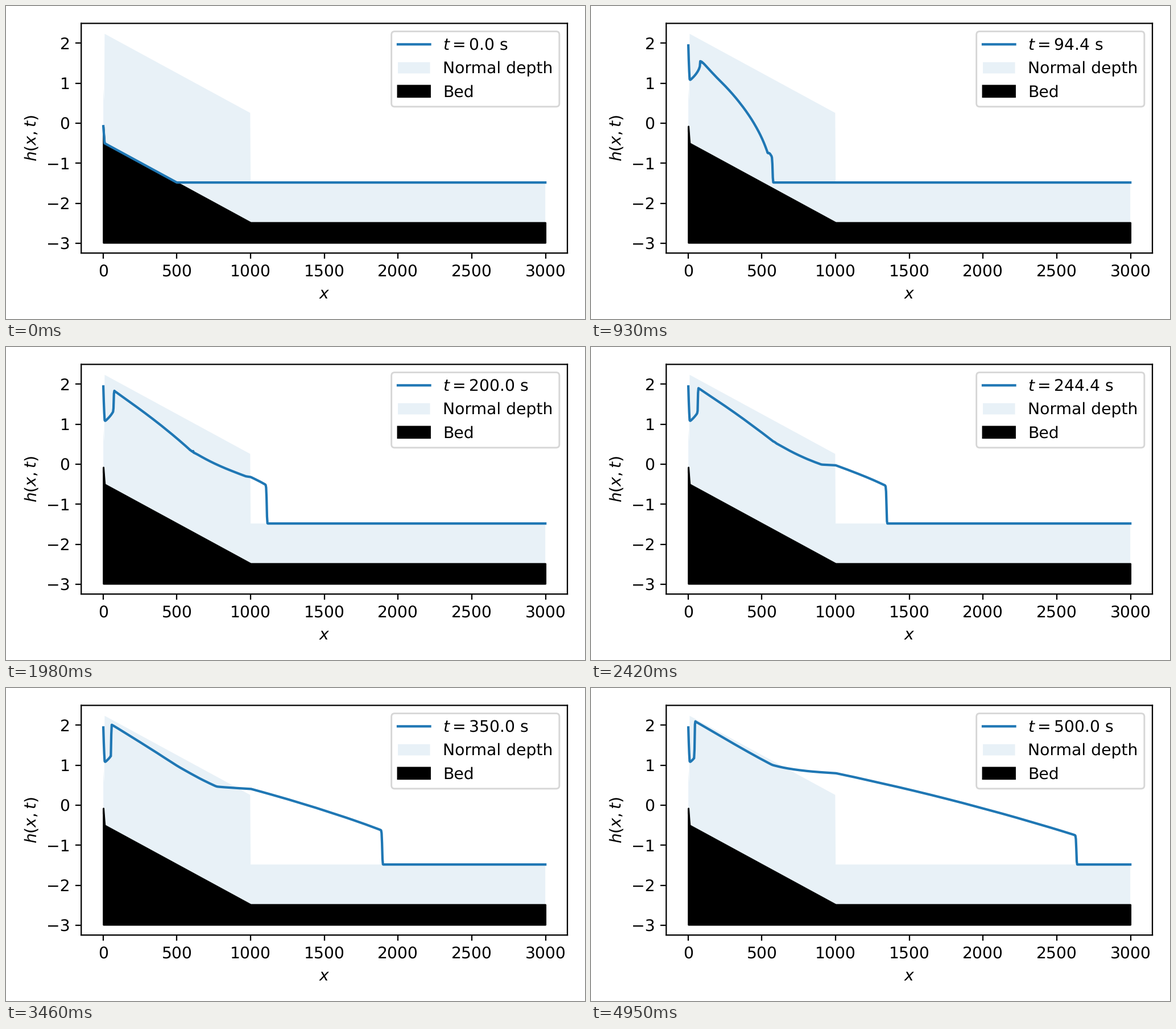
Write a matplotlib script that moves like this. It is 1018x550 px and loops after 5.01 s.

```python
import numpy as np
import matplotlib.pyplot as plt
from matplotlib.animation import FuncAnimation

WIDTH, HEIGHT, DPI = 1018, 550, 203.6
TICK_MS, LOOP_MS = 30, 5010
POSES, POSE_MS, T_END = 91, 55, 500.0
SUBSTEPS = 54

G, DRAG, INFLOW = 9.81, 0.004, 10.0
LAKE_LEVEL, DRY = -1.48, 1e-3
START = 2.0  # time for the inflow to fill the steep inlet

DX = 3.0
x = np.arange(DX / 2, 3000, DX)
bed = np.interp(x, [0, 10, 1000, 3000], [0, -0.5, -2.48, -2.48])

# Supercritical inlet: steady depths down the steep ramp
INLET = np.array([2.015, 1.80, 1.67, 1.60, 1.59])


def limited_slope(v):
    """Van Leer limited difference per cell."""
    d = np.diff(v)
    a, b = d[:-1], d[1:]
    p = a * b
    slope = np.zeros_like(v)
    slope[1:-1] = np.divide(2 * p, a + b, out=np.zeros_like(p), where=p > 0)
    return slope


def rates(h, q):
    """Shallow water tendencies: HLL flux with hydrostatic reconstruction."""
    u = np.divide(q, h, out=np.zeros_like(h), where=h > DRY)
    eta = h + bed
    sh, su, se = (limited_slope(v) / 2 for v in (h, u, eta))
    h_west, h_east = h - sh, h + sh
    z_west, z_east = eta - se - h_west, eta + se - h_east

    z = np.maximum(z_east[:-1], z_west[1:])
    hl = np.maximum(0, h_east[:-1] + z_east[:-1] - z)
    hr = np.maximum(0, h_west[1:] + z_west[1:] - z)
    ul, ur = (u + su)[:-1], (u - su)[1:]
    ql, qr = hl * ul, hr * ur
    cl, cr = np.sqrt(G * hl), np.sqrt(G * hr)
    s0 = np.minimum(np.minimum(ul - cl, ur - cr), 0)
    s1 = np.maximum(np.maximum(ul + cl, ur + cr), 0)

    def hll(fl, fr, jump):
        return (s1 * fl - s0 * fr + s0 * s1 * jump) / (s1 - s0 + 1e-12)

    mass = hll(ql, qr, hr - hl)
    momentum = hll(ql * ul + G / 2 * hl**2, qr * ur + G / 2 * hr**2, qr - ql)
    to_left = momentum + G / 2 * (h_east[:-1]**2 - hl**2)
    to_right = momentum + G / 2 * (h_west[1:]**2 - hr**2)
    source = G / 2 * (h_west + h_east) * (z_west - z_east)

    dh, dq = np.zeros_like(h), np.zeros_like(q)
    dh[1:-1] = (mass[:-1] - mass[1:]) / DX
    dq[1:-1] = (to_right[:-1] - to_left[1:] + source[1:-1]) / DX
    return dh, dq


def set_inlet(h, q):
    h[:len(INLET)] = INLET
    q[:len(INLET)] = INFLOW


def euler(h, q, dt):
    dh, dq = rates(h, q)
    h = np.maximum(h + dt * dh, 0)
    q = np.where(h > DRY, q + dt * dq, 0)
    q = q / (1 + dt * DRAG * np.abs(q) / np.maximum(h, DRY)**2)
    set_inlet(h, q)
    return h, q


def simulate():
    """Water surface at every pose."""
    h = np.maximum(LAKE_LEVEL - bed, 0)
    q = np.zeros_like(h)
    dt = T_END / (POSES - 1) / SUBSTEPS
    surfaces = [bed + h]
    for step in range((POSES - 1) * SUBSTEPS):
        if step * dt >= START:
            set_inlet(h, q)
            h1, q1 = euler(h, q, dt)
            h2, q2 = euler(h1, q1, dt)
            h, q = (h + h2) / 2, (q + q2) / 2
        if (step + 1) % SUBSTEPS == 0:
            surfaces.append(bed + h)
    return surfaces


def normal_depth():
    slope = np.where(x < 10, 0.05, 0.002)
    depth = np.cbrt(DRAG * INFLOW**2 / (G * slope))
    return np.where(x < 1000, depth, LAKE_LEVEL - bed)


surfaces = simulate()

# Smooth sub-pixel placement of lines and glyphs
plt.rcParams.update({"path.snap": False, "text.hinting": "none"})

# The small surplus keeps the pixel size from being rounded down
fig, ax = plt.subplots(dpi=DPI, figsize=((WIDTH + 0.01) / DPI,
                                         (HEIGHT + 0.01) / DPI))
line, = ax.plot(x, surfaces[0], color="tab:blue", label="$t=0.0$ s")
ax.fill_between(x, bed, bed + normal_depth(), facecolor="tab:blue",
                edgecolor="none", alpha=0.1, label="Normal depth")
ax.fill_between(x, bed, bed.min() - 0.5, color="black", label="Bed")
ax.set_xticks(range(0, 3001, 500))
ax.set_yticks(range(-3, 3))
ax.set_xlabel("$x$")
ax.set_ylabel("$h(x,t)$")
time_label = ax.legend(loc="upper right").get_texts()[0]
fig.tight_layout()


def update(tick):
    # A pose appears in the tick during which it falls due
    pose = min((tick * TICK_MS + TICK_MS - 5) // POSE_MS, POSES - 1)
    line.set_ydata(surfaces[pose])
    time_label.set_text(f"$t={T_END * pose / (POSES - 1):.1f}$ s")
    return line, time_label


anim = FuncAnimation(fig, update, frames=LOOP_MS // TICK_MS, interval=TICK_MS,
                     repeat=True, repeat_delay=0)
plt.show()
```
